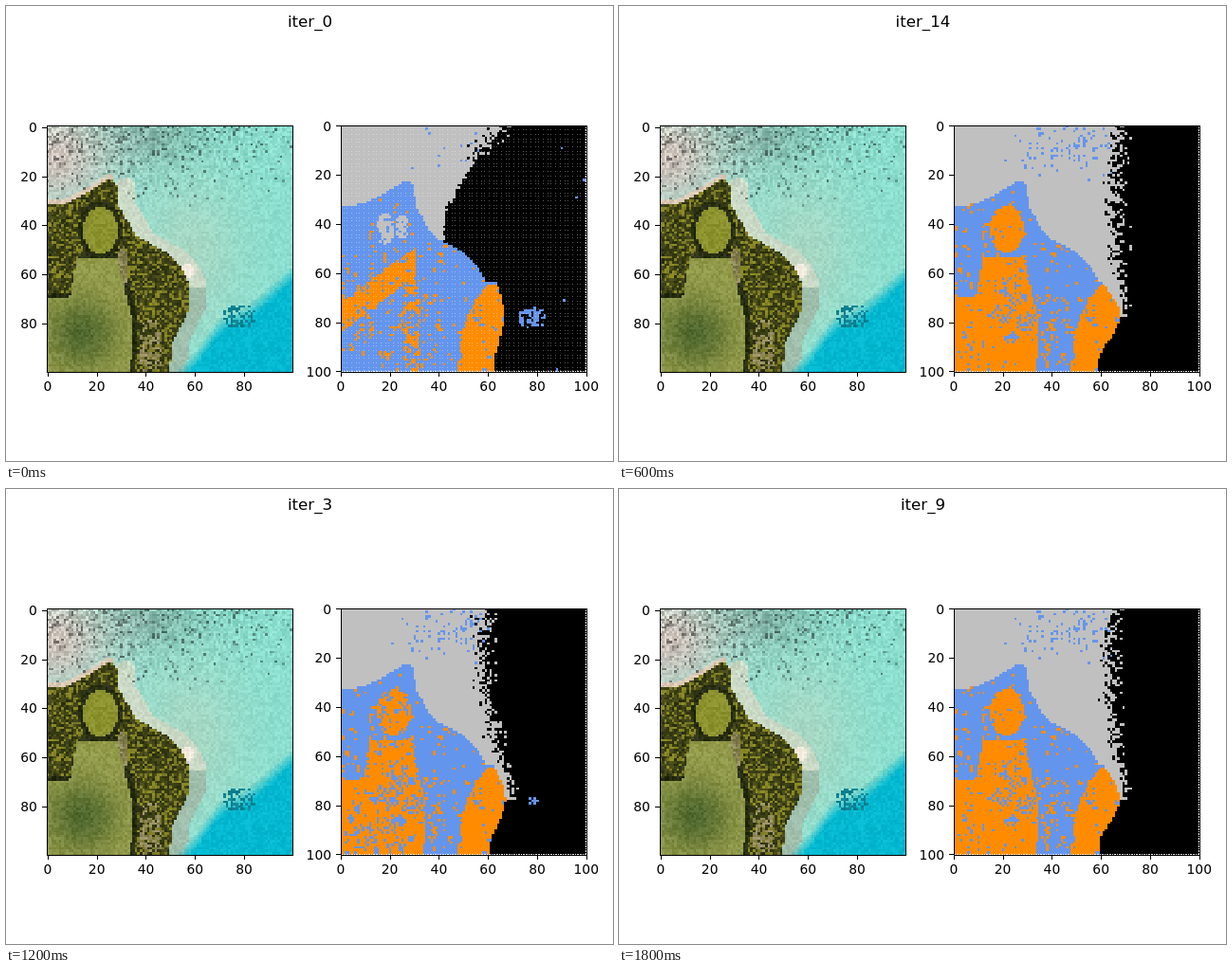
Animation, 640 px wide and 480 px high, one loop 1.9 s. Source, as an HTML page with a canvas:

```html
<!DOCTYPE html>
<html lang="en">
<head>
<meta charset="utf-8">
<title>Clustering iterations</title>
<style>
html, body { margin: 0; width: 100%; height: 100%; overflow: hidden; background: #fff; }
canvas, svg { position: absolute; left: 0; top: 0; width: 640px; height: 480px; }
text { font: 13.89px "DejaVu Sans", sans-serif; fill: #000; }
#title { font-size: 16.67px; }
</style>
</head>
<body>
<canvas id="map" width="640" height="480"></canvas>
<svg id="axes" viewBox="0 0 640 480"><text id="title" x="320.5" y="22" text-anchor="middle"></text></svg>
<script>
const ctx = document.getElementById('map').getContext('2d');
const svg = document.getElementById('axes');
const title = document.getElementById('title');
const N = 100, STEP = 2.59, TOP = 126.5, VIEW_X = 42.6, MAP_X = 352.8;
const STEP_MS = 100;
// Iterations play in alphabetical order of their names.
const ORDER = [...Array(19).keys()].sort((a, b) => String(a) < String(b) ? -1 : 1);

const at = (origin, i) => Math.round(origin + i * STEP);
const lerp = (a, b, t) => a + (b - a) * t;
const clamp = t => Math.max(0, Math.min(1, t));
const mix = (a, b, t) => a.map((v, i) => lerp(v, b[i], t));
const reach = (x, y, cx, cy, rx, ry) => ((x - cx) / rx) ** 2 + ((y - cy) / ry) ** 2;
const oval = (...args) => reach(...args) < 1;
const glow = (...args) => Math.exp(-reach(...args));

function hash(x, y, seed) {
  let h = Math.imul(x + 11, 374761393) ^ Math.imul(y + 7, 668265263) ^ Math.imul(seed + 3, 1274126177);
  h = Math.imul(h ^ (h >>> 13), 1274126177);
  h = Math.imul(h ^ (h >>> 15), 2246822519);
  return ((h ^ (h >>> 16)) >>> 0) / 4294967296;
}

const points = s => s.split(' ').map(p => p.split(',').map(Number));

function inside(poly, x, y) {
  let hit = false;
  for (let i = 0, j = poly.length - 1; i < poly.length; j = i++) {
    const [ax, ay] = poly[i], [bx, by] = poly[j];
    if ((ay > y) !== (by > y) && x < (bx - ax) * (y - ay) / (by - ay) + ax) hit = !hit;
  }
  return hit;
}

// Outlines shared by both panels
const coast = points('-9,33 8,31 19,25 25,21 28,23 29,32 36,44 43,48 49,51 54,56 58,64 58,73 51,88 48,110 -9,110');
const field = points('-9,71 9,69 12,54 28,53 35,80 33,110 -9,110');
const isClearing = (x, y) => oval(x, y, 21.5, 42, 7, 9.5);

/* ---- Aerial view ---- */
function landColor(x, y) {
  const n = hash(x, y, 1), m = hash(x, y, 2);
  const grain = (c, amount) => c.map(v => v + (n - .5) * amount);
  if (isClearing(x, y)) return grain([140, 146, 46], 24);
  if (inside(field, x, y)) return grain(mix([146, 154, 74], [78, 102, 44], glow(x, y, 14, 84, 13, 13)), 28);
  if (oval(x, y, 30.5, 57, 2.5, 8)) return grain([136, 132, 84], 50);
  if (oval(x, y, 42, 90, 5, 13) && m > .6) return grain([144, 136, 92], 50);
  if (inside(field, x - 2, y + 2) || oval(x, y, 21.5, 42, 9, 12)) return grain([40, 46, 18], 30);
  return n > .7 ? [116 + m * 30, 116 + m * 28, 36] : [38 + m * 44, 44 + m * 40, 14 + m * 14];
}

function waterColor(x, y) {
  const n = hash(x, y, 1), m = hash(x, y, 2);
  const grain = (c, amount) => c.map(v => v + (n - .5) * amount);
  if (oval(x, y, 57, 58.5, 2.5, 3)) return grain([244, 236, 224], 16);
  if (inside(coast, x, y + 2) && x < 27) return grain([218, 200, 180], 30);

  let c = mix([138, 222, 206], [166, 216, 196], glow(x, y, 58, 52, 22, 34));
  c = mix(c, [124, 180, 166], glow(x, y, 42, 4, 20, 12));
  c = mix(c, [206, 196, 188], glow(x, y, 3, 12, 26, 26));
  if (inside(coast, x - 7, y + 1)) c = y < 66 ? [202, 218, 198] : [160, 190, 172];
  const depth = y - 56 - .9 * (100 - x) + 5 * glow(x, 0, 70, 0, 8, 1);
  c = mix(c, [2, 184, 208], clamp(depth / 7));
  if (oval(x, y, 78, 77, 7, 5) && m > .5) c = [14, 130, 146];

  const rough = Math.max(0, 1 - y / 34) * Math.max(.25, 1 - x / 130);
  return m < rough * .32 ? c.map(v => v * (.5 + n * .35)) : grain(c, 20 + rough * 55);
}

function drawView() {
  for (let y = 0; y < N; y++) for (let x = 0; x < N; x++) {
    const c = inside(coast, x, y) ? landColor(x, y) : waterColor(x, y);
    const left = at(VIEW_X, x), top = at(TOP, y);
    ctx.fillStyle = `rgb(${c.map(Math.round)})`;
    ctx.fillRect(left, top, at(VIEW_X, x + 1) - left, at(TOP, y + 1) - top);
  }
}

/* ---- Cluster map ---- */
const SILVER = '#c0c0c0', BLUE = '#6495ed', ORANGE = '#ff8c00', BLACK = '#000';

// Border between silver and black: a slope that moves right and straightens.
function silverEdge(y, it) {
  const first = 42 + 23 * Math.max(0, 1 - y / 38) ** 1.3;
  const lag = 15 * Math.exp(-it / 7) * (1 - (y / 72) ** 2);
  const settled = 67.5 + 2 * ((y - 38) / 38) ** 2 - lag;
  return lerp(settled, first, Math.exp(-1.5 * it));
}

// Right end of the land below row 64: a wave that grows and drifts left.
function landEdge(y, it) {
  const e = Math.exp(-it / 5);
  return 63 + 1.5 * e + (4.7 - 2.7 * e) * Math.sin((y - 64) / 36 * 5.6 - .5);
}

const isLand = (x, y, it) => y < 64 ? inside(coast, x - 1.5, y - .7) : x < landEdge(y, it);
const isShore = (x, y) => y > 64 && x > 47 + 14 * Math.exp((64 - y) / 12);

// Chance of orange, first and after settling
function earlyOrange(x, y) {
  if (isShore(x, y)) return .97;
  if (x < 31 && Math.abs(y - 78 + .75 * x) < 6) return .85;
  if (x > 25 && x < 33 && y > 62) return .48;
  return y > 52 && x < 45 ? .1 : .015;
}

function lateOrange(x, y) {
  if (isShore(x, y) || isClearing(x, y)) return .98;
  if (inside(field, x, y)) return oval(x, y, 25, 72, 9, 17) ? .72 : .98;
  if (x > 35 && x < 47 && y > 64) return .24;
  return x < 14 ? .11 : .06;
}

function landCluster(x, y, it) {
  if (it < 1 && (oval(x, y, 18, 42, 3.5, 6.5) || oval(x, y, 25, 41, 3, 5)) && hash(x, y, 4) < .75) return SILVER;
  const p = lerp(lateOrange(x, y), earlyOrange(x, y), Math.exp(-it / 2.2));
  const clump = .65 * hash(x, y, 5) + .35 * hash(x >> 1, y >> 2, 6);
  return (clump - .13) / .74 < p ? ORANGE : BLUE;
}

function seaCluster(x, y, it) {
  const h = hash(x, y, 4);
  const spread = it < 1 ? (y < 15 ? 8 : 1.6) : y > 56 ? 4 : 7;
  const wobble = (hash(x, y, 9) + hash(x, y, 10) - 1) * spread;
  if (y < 78 && x < silverEdge(y, it) + wobble) {
    const fleck = .22 * glow(x, y, 47, 9, 15, 9) + .15 * glow(x, y, 29, 14, 3, 6);
    return y < 24 && h < fleck * Math.min(1, .08 + it * .3) ? BLUE : SILVER;
  }
  const patch = oval(x, y, 78, 78, 6 - it, 4.5 - it * 1.1) && it < 4;
  return patch && h > .4 || it < 1 && h > .9985 ? BLUE : BLACK;
}

function drawClusters(it) {
  ctx.fillStyle = '#fff';
  ctx.fillRect(353, 126, 260, 261);
  // Gaps between the round markers fill up as passes are drawn over each other.
  const gaps = it < 2 ? .36 / (1 + 2 * it) : 0;
  for (let y = 0; y < N; y++) for (let x = 0; x < N; x++) {
    const left = at(MAP_X, x) - 1, top = at(TOP, y) - 1;
    const w = at(MAP_X, x + 1) - 1 - left, h = at(TOP, y + 1) - 1 - top;
    ctx.fillStyle = isLand(x, y, it) ? landCluster(x, y, it) : seaCluster(x, y, it);
    ctx.fillRect(Math.max(353, left), top, w, h);
    if (x === N - 1) ctx.fillRect(left + w, top + 1, 1, 1);
    if (y === N - 1) ctx.fillRect(left + 1, top + h, 1, 1);
    if (gaps && w === 3 && h === 3) {
      ctx.fillStyle = `rgba(255,255,255,${gaps})`;
      ctx.fillRect(left + 2, top + 2, 1, 1);
    }
  }
}

/* ---- Axes ---- */
function add(tag, attrs, text = '') {
  const el = document.createElementNS('http://www.w3.org/2000/svg', tag);
  for (const k in attrs) el.setAttribute(k, attrs[k]);
  el.textContent = text;
  svg.append(el);
}

function drawAxes(origin, offset, last) {
  const left = Math.round(origin);
  add('rect', { x: left + .5, y: 126.5, width: 259, height: 260, fill: 'none', stroke: '#000' });
  for (let v = 0; v <= last; v += 20) {
    const d = (v + offset) * STEP;
    const x = Math.round(origin + d) + .5, y = Math.round(126.45 + d) + .5;
    add('path', { d: `M${x} 387v4M${left} ${y}h-5`, stroke: '#000' });
    add('text', { x: origin + d, y: 406, 'text-anchor': 'middle' }, v);
    add('text', { x: origin - 9.7, y: Math.round(131.6 + d), 'text-anchor': 'end' }, v);
  }
}

drawView();
drawAxes(VIEW_X, .5, 80);
drawAxes(MAP_X, 0, 100);

let shown = -1;
function render(ms) {
  const it = ORDER[Math.floor(ms / STEP_MS) % ORDER.length];
  if (it === shown) return;
  shown = it;
  title.textContent = 'iter_' + it;
  drawClusters(it);
}

const start = performance.now();
function tick() {
  render(performance.now() - start);
  requestAnimationFrame(tick);
}
tick();
</script>
</body>
</html>
```
